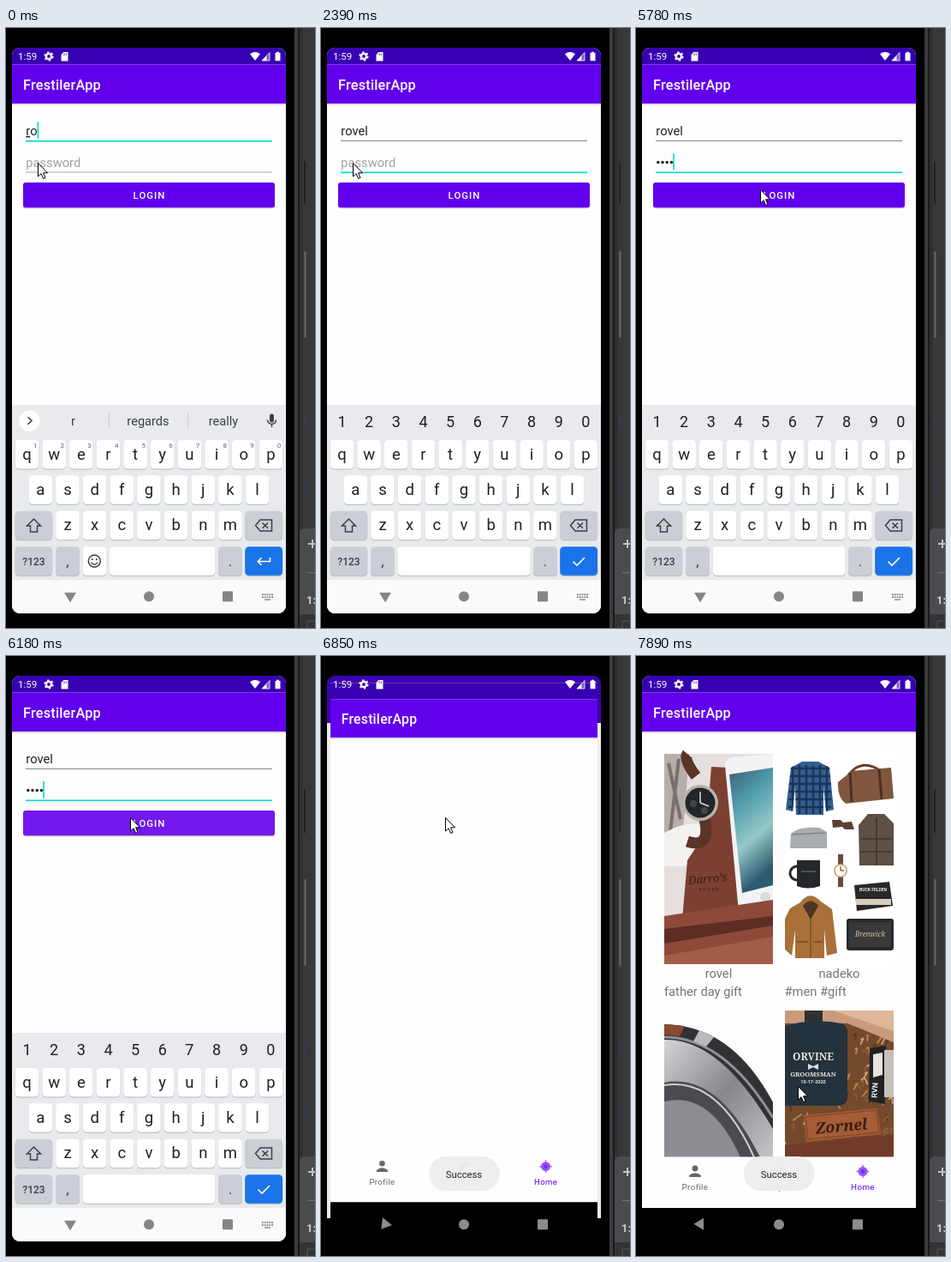
Recreate the animation shown at these times as an HTML page. Size 361 by 699 pixels, loop 8 s.

```html
<!DOCTYPE html>
<html lang="en">
<head>
<meta charset="utf-8">
<title>Login demo</title>
<style>
html, body { margin: 0; width: 100%; height: 100%; overflow: hidden; background: #000; }
svg { display: block; width: 100%; height: 100%; }
text { font-family: Roboto, "Noto Sans", sans-serif; white-space: pre; }
.serif { font-family: "Noto Serif", serif; }
.u { text-decoration: underline; }
</style>
</head>
<body>
<svg id="stage" viewBox="0 0 361 699" xmlns="http://www.w3.org/2000/svg"></svg>
<script>
const LOOP = 8000;
const APP = 'FrestilerApp';
const USER = 'rovel';
const PURPLE = '#6200ee', DARK = '#3700b3', TEAL = '#03dac5';

const rect = (x, y, w, h, fill, rx = 0, more = '') =>
  `<rect x="${x}" y="${y}" width="${w}" height="${h}" rx="${rx}" fill="${fill}" ${more}/>`;
const circ = (x, y, r, fill, more = '') => `<circle cx="${x}" cy="${y}" r="${r}" fill="${fill}" ${more}/>`;
const path = (d, fill, more = '') => `<path d="${d}" fill="${fill}" ${more}/>`;
const line = (d, color, w = 1, more = '') => path(d, 'none', `stroke="${color}" stroke-width="${w}" ${more}`);
const text = (x, y, size, str, fill, more = '') =>
  `<text x="${x}" y="${y}" font-size="${size}" fill="${fill}" ${more}>${str}</text>`;
const mid = (x, y, size, str, fill, more = '') => text(x, y, size, str, fill, 'text-anchor="middle" ' + more);
const group = (id, body, more = '') => `<g id="${id}" ${more}>${body}</g>`;

function desk() {
  return rect(0, 0, 361, 699, '#000') +
    rect(337, 0, 4, 699, '#3b3b3c') + rect(341, 0, 2, 699, '#1b1b1c') +
    rect(343, 0, 18, 699, '#38383a') + rect(343, 0, 4, 699, '#303032') +
    rect(348, 155, 2, 51, '#222224') + rect(348.5, 260, 2, 101, '#68686a', 1) +
    rect(348, 452, 1.5, 12, '#393a63') + rect(348, 523, 1.5, 22, '#33345a') +
    path('M361 583H349Q343 583 343 589V691H361Z', '#4a4b4e') +
    rect(352, 634, 9, 1, '#717275') +
    line('M353 601H361M358 596V606', '#c2c3c5', 2) +
    text(351, 671, 13, '1:1', '#d0d0d2', 'font-weight="700"') +
    rect(343, 683, 18, 16, '#343436') + line('M361 691H352V699', '#59595b');
}

function statusIcons() {
  return text(14, 37, 11.6, '1:59', '#fff') +
    circ(50, 33, 3.1, 'none', 'stroke="#fff" stroke-width="2.4"') +
    circ(50, 33, 4.8, 'none', 'stroke="#fff" stroke-width="1.6" stroke-dasharray="2.5 2.53"') +
    path('M64.5 31L67.5 28H72.5V38.5H64.5Z', '#fff') + line('M68 29.5V32M70.3 29.5V32', DARK, .8) +
    path('M285 30.3Q291 25.5 297 30.3L291 38Z', '#fff') +
    path('M299 38H308V28.5Z', '#fff', 'fill-opacity=".35"') + path('M299 38H304.5V32.3Z', '#fff') +
    line('M299 38H308V28.5Z', '#fff', .8) +
    path('M314.5 29H316V27.7H319V29H320.5V38.3H314.5Z', '#fff');
}

function appBar() {
  return rect(7, 88, 320, 2, '#dedede') + rect(7, 23, 320, 19.5, DARK) + rect(7, 42.5, 320, 45.5, PURPLE) +
    text(20, 72, 16.3, APP, '#fff', 'font-weight="500" letter-spacing=".2"');
}

function key(x, y, w, fill = '#fff') {
  return rect(x, y + 1, w, 33.5, '#b4b7bb', 4.5) + rect(x, y, w, 33.5, fill, 4.5);
}

function keyRow(chars, x0, y) {
  return [...chars].map((c, i) => {
    const cx = x0 + i * 31.65;
    return key(cx - 13.8, y, 27.6) + mid(cx, y + 22.7, 18.5, c, '#1f2023');
  }).join('');
}

const digits = (x, y, size, fill) =>
  [...'1234567890'].map((c, i) => mid(x + i * 31.65, y, size, c, fill)).join('');

function keyboard() {
  const grey = '#cbced4', ink = '#3c4043';
  return rect(7, 439, 320, 204, '#e8eaed') +
    keyRow('qwertyuiop', 24.5, 480) + keyRow('asdfghjkl', 40.3, 521.3) + keyRow('zxcvbnm', 72, 562.7) +
    key(10.7, 562.7, 43.5, grey) + key(279.3, 562.7, 43.8, grey) +
    key(10.7, 604.3, 43.5, grey) + key(58, 604.3, 28, grey) +
    key(248, 604.3, 28, grey) + key(279.3, 604.3, 43.8, '#1a73e8') +
    line('M32.5 572L24.5 580H28.5V587H36.5V580H40.5Z', ink, 1.5) +
    line('M297 573H310.5V586H297L291.5 579.5ZM299.5 576.5L306 582.8M306 576.5L299.5 582.8', ink, 1.5) +
    mid(32.5, 625.5, 12, '?123', ink, 'font-weight="500"') +
    mid(72, 627, 17, ',', ink) + mid(262, 627, 17, '.', ink) +
    group('textKeys',
      digits(34.2, 489, 8, '#5f6368') +
      circ(27.5, 457.5, 12.2, '#fff') + line('M25.5 453.2L30 457.5L25.5 461.8', ink, 1.5) +
      rect(120, 448, 1, 19, '#cdd0d4') + rect(212, 448, 1, 19, '#cdd0d4') +
      [78.5, 166, 254].map(x => mid(x, 463, 14.6, '', ink, 'class="hint"')).join('') +
      rect(308, 449.5, 5, 10, ink, 2.5) + line('M305.5 456.5A5 5 0 0 0 315.5 456.5M310.5 461.5V465', ink, 1.4) +
      key(89.5, 604.3, 28) + key(121, 604.3, 123.5) +
      circ(103.3, 621, 7, 'none', `stroke="${ink}" stroke-width="1.5"`) +
      circ(100.8, 619, 1.1, ink) + circ(105.8, 619, 1.1, ink) + line('M99.5 622.6Q103.3 627.5 107.1 622.6', ink, 1.4) +
      line('M308.5 617V621.5H294.5M298.5 617.3L294.3 621.5L298.5 625.7', '#fff', 1.6)) +
    group('passKeys',
      digits(24.5, 464.5, 18, '#1f2023') + key(89.5, 604.3, 155) +
      line('M294.5 621.5L299 626L308 617', '#fff', 1.6));
}

function loginScreen() {
  const dots = [0, 1, 2, 3].map(i => circ(25.8 + i * 5.2, 156.5, 1.75, '#212121', 'class="dot"')).join('');
  return rect(7, 23, 320, 660, '#fefefe') + appBar() +
    `<text x="23.3" y="125" font-size="14.7" fill="#212121"><tspan id="marked" class="u"></tspan><tspan id="plain"></tspan></text>` +
    rect(23, 131, 288, 1, '#858585', 0, 'id="line1"') + rect(23, 167.5, 288, 1, '#ababab', 0, 'id="line2"') +
    text(23.3, 162, 14.7, 'password', '#a2a2a2', 'id="passHint"') + dots +
    text(0, 161.5, 14.7, '', '#212121', 'id="lastChar"') +
    rect(0, 0, 1.6, 19.5, TEAL, 0, 'id="caret"') +
    rect(20, 181, 294, 29.5, '#d5d5d5', 3) + rect(20, 180, 294, 29.3, PURPLE, 3, 'id="button"') +
    mid(167.5, 199, 11.4, 'LOGIN', '#fff', 'font-weight="500" letter-spacing="1.02"') +
    keyboard() + rect(7, 643, 320, 40, '#fafafa');
}

function deskGift() {
  return rect(33, 114, 127, 245, '#e5e0dd') +
    path('M33 114H62L55 205L33 225Z', '#b7aeab') + line('M38 125L52 190M50 120L40 205', '#77706e', 4) +
    path('M33 206Q70 185 92 205L82 245H33Z', '#f4f2ef') +
    path('M88 129L160 133V330H52L60 238L82 205Z', '#7b4031') +
    line('M70 140Q55 120 60 114M80 190Q88 225 60 216', '#5b3428', 13) +
    circ(75, 171, 21, '#b9b2ac') + circ(75, 171, 17.5, '#22262b') +
    line('M75 171V158M75 171L85 175', '#d9d9d9', 1.5) +
    circ(67, 172, 4, '#40464c') + circ(80, 180, 4, '#40464c') +
    path('M104 127Q104 119 112 118L160 114V291L128 297Q121 298 119 288Z', '#f3f3f4') +
    path('M109 138L160 130V267L124 276Z', 'url(#sea)') + circ(151, 281, 6, '#d9dadc') +
    path('M33 303L160 284V359H33Z', '#8d4a38') + path('M33 318L160 303V314L33 335Z', '#5b2d23') +
    path('M33 349L160 327V359H33Z', '#a35d46') +
    mid(84, 264, 13, 'Darro’s', '#3a1912', 'class="serif" font-style="italic" transform="rotate(-5 84 264)"') +
    mid(86, 274, 6, 'STUFF', '#3a1912', 'class="serif" letter-spacing="1.5"');
}

function clothes() {
  let plaid = '';
  for (let i = 0; i < 6; i++) plaid += `M${183 + i * 8} 127V184M178 ${131 + i * 9}H228`;
  return rect(174, 114, 127, 245, '#fff') +
    path('M194 123H213L226 130L231 179L222 181L219 152V185H187L186 152L183 181L175 179L181 130Z', '#315f91') +
    `<g clip-path="url(#shirt)">${line(plaid, '#1d3456', 2.5)}</g>` +
    line('M246 142Q262 116 289 136', '#6a4028', 3) +
    path('M236 147L252 134L298 130L301 166L245 172Q235 165 236 147Z', '#80563e') +
    line('M250 136L252 170M284 132L287 167', '#4d2f22', 3) +
    path('M181 207Q190 198 214 200L223 205V224H180Z', '#a9adb0') + line('M182 208L221 206', '#6f7477') +
    path('M229 191H239L242 194L252 193L255 202H244L241 199L230 200Z', '#5b4032') +
    path('M271 184H290L301 195V244H261L260 197Z', '#5d5044') +
    line('M281 188V244M262 213H300M262 228H300', '#3f352d', 1.5) +
    path('M188 238H215V268Q201 273 188 268Z', '#24282b') +
    circ(188, 253, 8, 'none', 'stroke="#24282b" stroke-width="3"') + line('M193 251H210', '#777', 1) +
    line('M239 231V269', '#6a4a38', 6) + circ(239, 250, 8, '#d1a77b') + circ(239, 250, 6.3, '#fbfbf8') +
    line('M239 250V245M239 250H243', '#333') +
    path('M255 267L296 263L300 291L258 297Z', '#27282a') + rect(257, 283, 41, 7, '#d8cdb8') +
    mid(277, 274, 5, 'BUCK FELDEN', '#eee', 'font-weight="700"') +
    path('M192 287Q203 272 216 286L229 295L235 346L223 349L220 319V352H186V319L182 349L174 342V306L180 294Z', '#a9703a') +
    path('M195 291Q204 280 213 291L204 307Z', '#4c3424') + line('M204 306V352M188 333H201M207 333H218', '#764922', 1.3) +
    rect(246, 306, 55, 37, '#28292b', 3) + rect(249, 310, 49, 29, '#38393b') +
    mid(273.5, 327, 8, 'Brenwick', '#d9c89b', 'class="serif" font-style="italic"');
}

function wheel() {
  return '<g clip-path="url(#tileL)">' + rect(33, 413, 127, 171, '#fdfdfd') +
    path('M33 429Q112 430 160 520V584H33Z', '#303236') +
    path('M33 447Q98 445 160 551V584H33Z', 'url(#steel)') +
    line('M33 444Q103 444 160 538', '#8f9195', 3) +
    path('M33 429L57 431L51 443L33 441Z', '#8a4a30') + path('M74 436L91 444L82 455L67 449Z', '#b9babd') +
    path('M33 497Q95 484 145 584H33Z', '#494b50') + path('M33 519Q87 506 122 584H33Z', '#8b8d93') +
    line('M33 500Q96 490 138 584', '#d0d1d4', 2) + '</g>';
}

function flask() {
  let seed = 7, out = '';
  const rnd = () => (seed = seed * 16807 % 2147483647) / 2147483647;
  const tones = ['#d0a576', '#8d5d36', '#593820', '#b88552'];
  for (let i = 0; i < 110; i++) {
    const x = 174 + rnd() * 127, y = 440 + rnd() * 140;
    out += line(`M${x.toFixed(1)} ${y.toFixed(1)}q${(rnd() * 8).toFixed(1)} -6 ${(rnd() * 16 - 8).toFixed(1)} 5`, tones[i % 4], 1.8);
  }
  return '<g clip-path="url(#tileR)">' + rect(174, 413, 127, 171, '#744a2c') + out +
    path('M174 413H301V450L247 428H174Z', '#c99b7c') + path('M230 413H301V437Z', '#ddb899') +
    rect(197, 413, 21, 16, '#2e3134') +
    path('M174 431Q206 422 240 428Q248 431 247 441V516Q245 524 235 524H174Z', '#23323d') +
    mid(207, 471, 12, 'ORVINE', '#e8e3d9', 'class="serif" font-weight="700"') +
    path('M201 475L207 478L213 475V482L207 479L201 482Z', '#ddd') +
    mid(207, 490, 7.6, 'GROOMSMAN', '#e8e3d9', 'class="serif" font-weight="700"') +
    mid(207, 498, 5.5, '10-17-2020', '#e8e3d9', 'font-weight="700"') +
    path('M273 457L292 454L291 522L272 519Z', '#202124') + path('M277 464L288 462V488L277 491Z', '#e6e2dc') +
    path('M290 459H301V514H290Z', '#c5c0b9') +
    mid(282, 506, 9, 'RVN', '#f1eee8', 'font-weight="700" transform="rotate(-87 282 506)"') +
    path('M196 535L282 527L286 557L199 566Z', '#a45d37') + line('M198 537L281 529L284 555L201 563Z', '#7e4224') +
    mid(240, 554, 18, 'Zornel', '#3b1d10', 'class="serif" font-style="italic" font-weight="600" transform="rotate(-5 240 550)"') +
    path('M174 570L301 557V584H174Z', '#713a2a') + '</g>';
}

function tabs() {
  const label = (x, str, fill) => mid(x, 622, 9.8, str, fill, 'letter-spacing=".35"');
  const grey = '#666';
  return rect(7, 583.5, 320, 59.5, '#fefefe') +
    circ(69, 597, 3.4, grey) + path('M62.3 607V604.8Q69 599.5 75.7 604.8V607Z', grey) + label(69, 'Profile', grey) +
    path('M160.5 607V603L170 593.5L174 597.5L164.5 607Z', grey) + label(167, 'Compose', grey) +
    circ(265, 600.5, 5.6, '#a269f4') + line('M265 593V608M257.5 600.5H272.5', '#a269f4', 1.6) +
    circ(265, 600.5, 2.6, '#7a2bf0') + circ(265, 600.5, 4.2, 'none', 'stroke="#7a2bf0" stroke-width=".8"') +
    label(265, 'Home', PURPLE);
}

function homeScreen() {
  const cap = '#757575';
  return rect(7, 23, 320, 660, '#000') + rect(7, 23, 320, 55, '#3d00b0') + rect(7, 78, 320, 577, '#ededed') +
    group('win',
      rect(7, 23, 320, 660, '#000') + rect(7, 23, 320, 620, '#fefefe') + appBar() +
      group('cards', deskGift() + clothes() + wheel() + flask() +
        mid(96.5, 375, 14.7, USER, cap) + text(33, 396, 14.7, 'father day gift', cap) +
        mid(237.5, 375, 14.7, 'nadeko', cap) + text(173.5, 396, 14.7, '#men #gift', cap)) +
      tabs());
}

function navIcons() {
  return group('nav',
    path('M-7.5 0L4 -7V7Z', 'inherit', 'id="back"').replace('fill="inherit"', '') +
    '<circle cx="167" cy="662.3" r="6"/><rect x="253" y="656.3" width="12" height="12" rx=".8"/>') +
    group('imeIcon', line('M299 660H312M299 663H312', '#8b8b8b', 1.8, 'stroke-dasharray="1.8 1"') +
      line('M302 666H309', '#8b8b8b', 1.4));
}

const clip = (id, body) => `<clipPath id="${id}">${body}</clipPath>`;
const grad = (id, dir, ...stops) => `<linearGradient id="${id}" ${dir}>` +
  stops.map((c, i) => `<stop offset="${i / (stops.length - 1)}" stop-color="${c}"/>`).join('') + '</linearGradient>';

document.getElementById('stage').innerHTML = '<defs>' +
  clip('screen', '<rect x="7" y="23" width="320" height="659" rx="9"/>') +
  clip('tileL', '<rect x="33" y="413" width="127" height="171"/>') +
  clip('tileR', '<rect x="174" y="413" width="127" height="171"/>') +
  clip('shirt', '<path d="M194 123H213L226 130L231 179L222 181L219 152V185H187L186 152L183 181L175 179L181 130Z"/>') +
  grad('sea', 'x2=".3" y2="1"', '#3b5d78', '#4f9dae', '#95c9c7', '#2d5b70') +
  grad('steel', 'x2="1" y2="1"', '#d3d4d6', '#85878b', '#c4c5c8') + '</defs>' +
  desk() +
  group('device', group('login', loginScreen()) + group('home', homeScreen()) + statusIcons() + navIcons() +
    group('toast', rect(126, 583, 82.5, 40, '#eeeeee', 20, 'fill-opacity=".96"') + mid(167, 608, 11.3, 'Success', '#212121')),
    'clip-path="url(#screen)"') +
  path('M.5 .5V16L4.1 12.7L6.6 18.5L9 17.4L6.5 11.8H11.5Z', '#fff', 'id="mouse" stroke="#000" stroke-width="1" stroke-linejoin="round"');

// Step tables: [start ms, values...]
const typed = [[0, 2, 1], [120, 2, 2], [500, 3, 2], [620, 3, 3], [870, 5, 4], [1120, 5, 5], [1770, 5, 0]];
const hints = [[0, 'r', 'regards', 'really'], [250, 'ro', 'room', 'Rome'], [620, 'rov', 'Rov', 'roving'],
  [870, 'rove', 'rover', 'roves'], [1120, USER, 'Rovel', 'Rovels']];
const pass = [[0, 0, '', 23], [2890, 0, 't', 28], [3270, 1, 'e', 36.5], [3520, 2, 's', 41.5], [3770, 3, 't', 43.2], [5290, 4, '', 43.2]];
const caretOn = [[0, 1], [1520, 0], [1770, 1], [2390, 0], [2890, 1], [4270, 0], [4800, 1], [5290, 0], [5780, 1], [6320, 0]];
const press = [[0, PURPLE], [5920, '#6608ee'], [6040, '#6c10ee'], [6180, '#7218ee'], [6320, PURPLE]];
const toast = [[0, 0], [6580, .3], [6700, .6], [6850, 1]];
const zoom = [[0, .975, -52], [7000, .993, -15], [7120, 1, 0]];
const mouse = [[0, 37, 157], [5050, 46, 168], [5170, 68, 188], [5290, 92, 200], [5540, 122, 199], [5660, 138, 192],
  [5780, 145, 188], [7510, 152, 235], [7630, 164, 320], [7770, 179, 420], [7890, 189, 501]];

const at = (steps, t) => steps.findLast(s => s[0] <= t).slice(1);
const $ = id => document.getElementById(id);
const set = (id, attrs) => { for (const k in attrs) $(id).setAttribute(k, attrs[k]); };
const show = (id, on) => set(id, { visibility: on ? 'inherit' : 'hidden' });
const hintEls = document.querySelectorAll('.hint'), dotEls = document.querySelectorAll('.dot');

function draw(t) {
  const home = t >= 6850, inPass = t >= 1770, passKeys = t >= 1890;
  show('login', !home);
  show('home', home);
  show('imeIcon', !home);

  const [len, marked] = at(typed, t);
  $('marked').textContent = USER.slice(0, marked);
  $('plain').textContent = USER.slice(marked, len);
  at(hints, t).forEach((s, i) => hintEls[i].textContent = s);
  show('textKeys', !home && !passKeys);
  show('passKeys', !home && passKeys);

  set('line1', inPass ? { fill: '#858585', height: 1 } : { fill: TEAL, height: 1.6 });
  set('line2', inPass ? { fill: TEAL, height: 1.6 } : { fill: '#ababab', height: 1 });
  const [dots, last, passX] = at(pass, t);
  show('passHint', !home && t < 2890);
  dotEls.forEach((d, i) => d.setAttribute('visibility', i < dots ? 'inherit' : 'hidden'));
  $('lastChar').textContent = last;
  set('lastChar', { x: 23.3 + dots * 5.2 });
  const textX = 23.3 + $('marked').parentNode.getComputedTextLength();
  set('caret', { x: inPass ? passX : textX, y: inPass ? 146 : 109.3 });
  show('caret', !home && at(caretOn, t)[0]);
  set('button', { fill: at(press, t)[0] });

  const [scale, turn] = at(zoom, t);
  set('win', { transform: `translate(167 368) scale(${scale}) translate(-167 -368)` });
  show('cards', home && t >= 7510);
  set('back', { transform: `translate(75 661.8) rotate(${home ? turn : -90})` });
  set('nav', { fill: home ? '#8c8c8c' : '#858585' });
  set('toast', { opacity: at(toast, t)[0] });
  set('mouse', { transform: `translate(${at(mouse, t)})` });
}

const start = performance.now();
function tick() {
  draw((performance.now() - start) % LOOP);
  requestAnimationFrame(tick);
}
tick();
</script>
</body>
</html>
```
